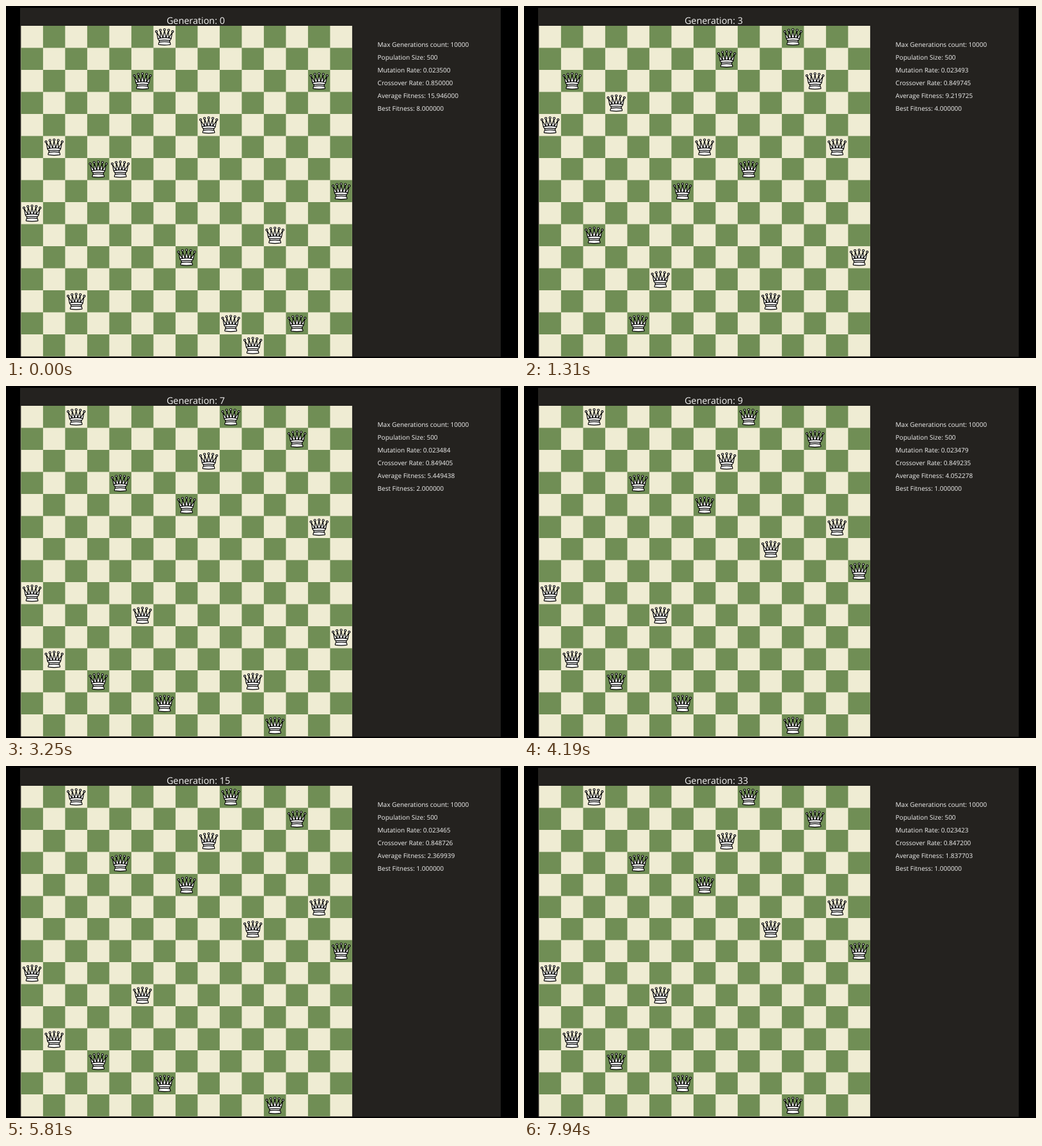
An HTML page that plays this animation: 800x551 px, repeating every 8 s.

```html
<!DOCTYPE html>
<html lang="en">
<head>
<meta charset="utf-8">
<title>N-Queens genetic search</title>
<style>
  html, body { margin: 0; width: 100%; height: 100%; overflow: hidden; background: #000; }
  svg { display: block; width: 800px; height: 551px; }
  text { font: 10px "Open Sans", "Noto Sans", sans-serif; fill: #f4f4f3; text-rendering: geometricPrecision; }
  #title { font-size: 14.4px; }
</style>
</head>
<body>
<svg viewBox="0 0 800 551">
  <defs>
    <g id="queen" transform="scale(.767)" fill="#fff" stroke="#000" stroke-width="1.5" stroke-linecap="round" stroke-linejoin="round">
      <path d="M9 26C17.5 24.5 30 24.5 36 26L38.5 13.5 31 25 30.7 10.9 25.5 24.5 22.5 10 19.5 24.5 14.3 10.9 14 25 6.5 13.5Z"/>
      <path d="M9 26C9 28 10.5 28 11.5 30 12.5 31.5 12.5 31 12 33.5 10.5 34.5 11 36 11 36 9.5 37.5 11 38.5 11 38.5 17.5 39.5 27.5 39.5 34 38.5 34 38.5 35.5 37.5 34 36 34 36 34.5 34.5 33 33.5 32.5 31 32.5 31.5 33.5 30 34.5 28 36 28 36 26 30 24.5 17.5 24.5 9 26Z"/>
      <path fill="none" d="M11.5 30C15 29 30 29 33.5 30M12 33.5C18 32.5 27 32.5 33 33.5"/>
      <circle cx="6" cy="12" r="2"/><circle cx="14" cy="9" r="2"/><circle cx="22.5" cy="8" r="2"/><circle cx="31" cy="9" r="2"/><circle cx="39" cy="12" r="2"/>
    </g>
  </defs>
  <rect x="22" y="3" width="751" height="546" fill="#24221f"/>
  <path id="light" fill="#efecd3"/>
  <path id="dark" fill="#708e55"/>
  <g id="queens"></g>
  <text id="title" x="250.9" y="27.7"></text>
  <g id="stats"></g>
</svg>
<script>
const LOOP = 8000, STEP = 62.5;
const SIZE = 15, CELL = 34.5, LEFT = 23.4, TOP = 30.9;
const MAX_GENERATIONS = 10000;

// Milestones of the search; a board holds the queen's row for each column.
const first = [8, 5, 12, 6, 6, 2, 0, 10, 4, 13, 14, 9, 13, 2, 7];
const second = [4, 2, 9, 3, 13, 11, 7, 5, 1, 6, 12, 0, 2, 5, 10];
const third = mutate(second, { 0: 14, 1: 9, 2: 6, 6: 5, 7: 8, 8: 2, 9: 0, 11: 14, 12: 1, 14: 7 });
const fourth = mutate(third, [8, 11, 0, 12, 3, 9, 13, 4], { 14: 10 });
const last = mutate(fourth, { 10: 6, 14: 7 });
const MILESTONES = [
  { at: 0, best: 8, average: 15.946, board: first },
  { at: 3, best: 4, average: 9.219725, board: second },
  { at: 5, best: 3, average: 7.485643, board: third },
  { at: 7, best: 2, average: 5.449438, board: fourth },
  { at: 11, best: 1, average: 3.852684, board: last },
  { at: 22, best: 1, average: 1.855181, board: last },
  { at: 33, best: 1, average: 1.837703, board: last }
];

function mutate(board, ...genes) {
  return Object.assign([...board], ...genes);
}

// A steady pace that speeds up sharply towards the end.
function generationAt(seconds) {
  return Math.floor(.45 + 2.05 * seconds + (seconds / 4.53) ** 5);
}

function nearestMilestone(generation) {
  const distance = m => Math.abs(m.at - generation);
  return MILESTONES.reduce((a, b) => distance(b) <= distance(a) ? b : a);
}

function averageFitness(generation) {
  const i = MILESTONES.findIndex(m => m.at >= generation);
  if (i < 1) return MILESTONES.at(i).average;
  const from = MILESTONES[i - 1], to = MILESTONES[i];
  const left = (to.at - generation) / (to.at - from.at);
  return to.average + (from.average - to.average) * left ** 3;
}

const byId = id => document.getElementById(id);
const x = col => LEFT + col * CELL;
const y = row => TOP + row * CELL;

function add(parent, tag, attributes) {
  const node = document.createElementNS("http://www.w3.org/2000/svg", tag);
  for (const key in attributes) node.setAttribute(key, attributes[key]);
  return parent.appendChild(node);
}

const square = (col, row, size) => `M${x(col)} ${y(row)}h${size}v${size}h${-size}z`;
let dark = "";
for (let row = 0; row < SIZE; row++)
  for (let col = (row + 1) % 2; col < SIZE; col += 2) dark += square(col, row, CELL);
byId("dark").setAttribute("d", dark);
byId("light").setAttribute("d", square(0, 0, SIZE * CELL));

const queens = first.map((_, col) => add(byId("queens"), "use", { href: "#queen", x: x(col) }));
const stats = Array.from({ length: 6 }, (_, i) => add(byId("stats"), "text", { x: 580.6, y: 63.6 + i * 20 }));

let shown = -1;
function render(time) {
  const tick = Math.floor((time % LOOP + 2.5) / STEP) * STEP;
  const generation = generationAt(tick / 1000);
  if (generation === shown) return;
  shown = generation;

  const decay = Math.exp(-generation / MAX_GENERATIONS);
  const { best, board } = nearestMilestone(generation);
  byId("title").textContent = `Generation: ${generation}`;
  [
    `Max Generations count: ${MAX_GENERATIONS}`,
    "Population Size: 500",
    `Mutation Rate: ${(.0235 * decay).toFixed(6)}`,
    `Crossover Rate: ${(.85 * decay).toFixed(6)}`,
    `Average Fitness: ${averageFitness(generation).toFixed(6)}`,
    `Best Fitness: ${best.toFixed(6)}`
  ].forEach((line, i) => stats[i].textContent = line);
  queens.forEach((queen, col) => queen.setAttribute("y", y(board[col])));
}

const start = performance.now();
function frame() {
  render(performance.now() - start);
  requestAnimationFrame(frame);
}
frame();
</script>
</body>
</html>
```
